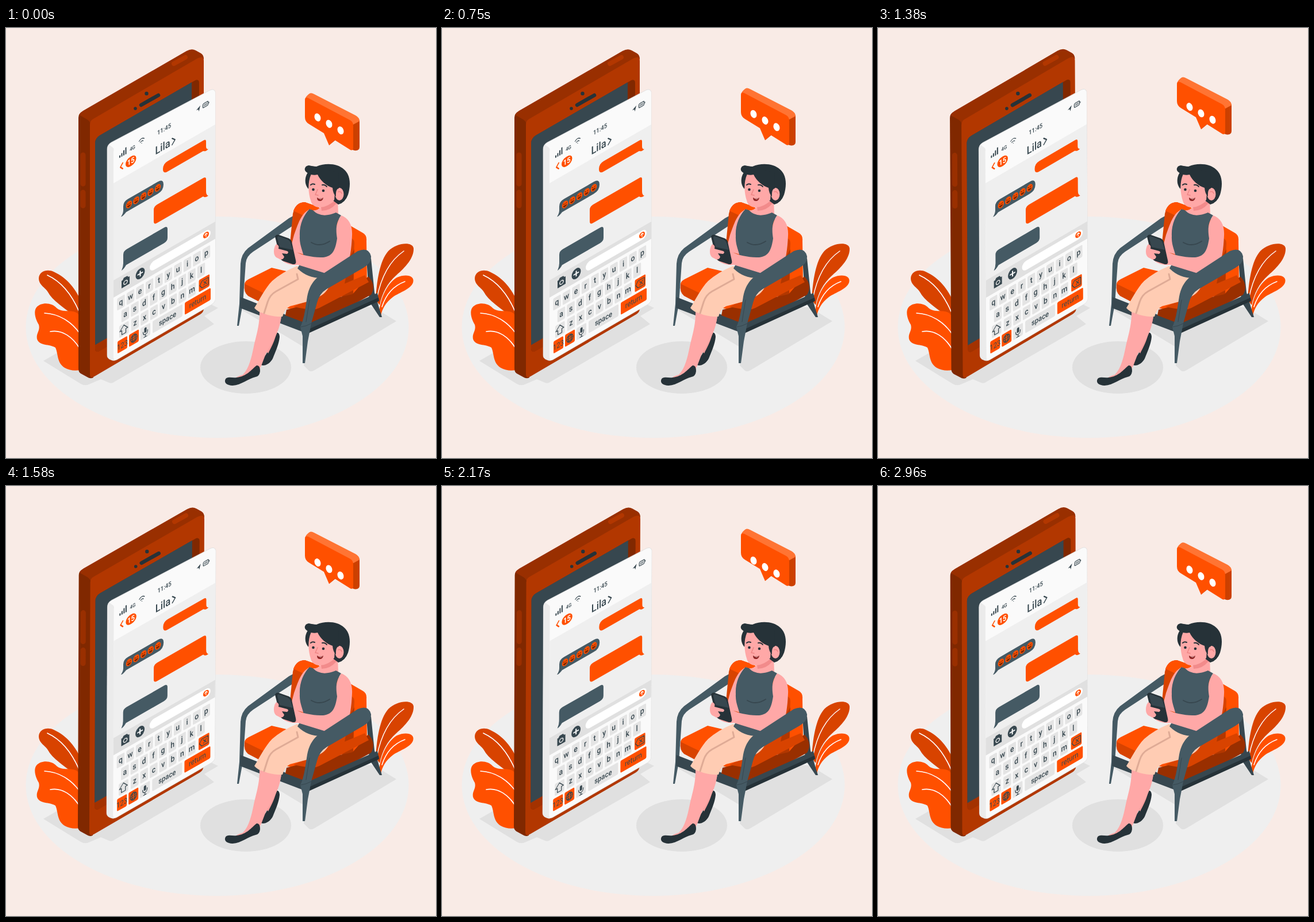
Recreate the animation shown at these times as an HTML page. Size 748 by 748 pixels, loop 3000 ms.

```html
<!DOCTYPE html>
<html lang="en">
<head>
<meta charset="utf-8">
<title>Chatting on the phone</title>
<style>
html, body { margin: 0; width: 100%; height: 100%; overflow: hidden; background: #f9ebe6 }
svg { display: block; width: 100vw; height: 100vh }
text { font-family: Roboto, "Liberation Sans", sans-serif; font-stretch: condensed; text-anchor: middle }
.o { fill: #ff5000 } .d { fill: #455a64 } .k { fill: #37474f } .b { fill: #263238 }
.s { fill: #ffa8a7 } .g { fill: #e0e0e0 } .w { fill: #fff }
.line { fill: none; stroke-linecap: round; stroke-linejoin: round }
</style>
</head>
<body>
<svg viewBox="0 0 748 748">
  <!-- floor and shadows -->
  <ellipse cx="367.500" cy="520.500" rx="333" ry="192.500" fill="#efefef"/>
  <g class="g">
    <path d="M65 579L112 552L343 474L369 487L345 501L362 515L186 617Q182 619 177 616L165 611L144 620Q137 623 130 619Z"/>
    <ellipse cx="417" cy="590.500" rx="79" ry="45.500"/>
    <path d="M409 490L500 480L640 486L679 510L537 595Q531 599 527 596L518 587V555L455 517Z"/>
  </g>

  <!-- right plant -->
  <path fill="#d84300" d="M643 473C645 440 650 405 665 388C680 373 707 371 709 383C710 400 695 416 679 430C663 444 654 462 650 482Z"/>
  <path class="o" d="M649 496C651 470 663 444 680 434C696 427 712 431 708 443C703 455 686 459 673 468C660 478 655 488 652 500Z"/>
  <path class="line" stroke="#fff" stroke-width="1.500" d="M645 471C652 435 667 405 692 388M654 485C661 463 675 448 694 441"/>

  <!-- left plant -->
  <path fill="#d84300" d="M132 512C110 492 83 477 74 461C69 451 57 448 57 435C58 422 73 419 83 424C107 435 122 455 132 478Z"/>
  <path class="o" d="M140 592Q118 600 102 591C88 582 91 566 86 556C76 549 58 554 54 541C52 531 60 527 57 516C52 508 47 494 53 486C62 476 80 478 88 487C98 496 114 489 124 496L142 515Z"/>
  <path class="line" stroke="#fff" stroke-width="1.700" d="M72 430C96 441 114 463 127 493M67 496C92 497 114 511 128 531M77 528C98 524 116 538 128 557"/>

  <!-- phone -->
  <g id="phone">
    <path fill="#802800" d="M126 156Q126 148 134 145L152 158V608Q147 611 141 607L130 601Q126 598 126 593Z"/>
    <path fill="#992f00" d="M127 151Q129 147 134 144L314 40Q323 35 330 39L339 44Q344 47 344 54L147 168Q146 162 141 159Z"/>
    <path fill="#b23700" d="M146 168Q146 161 152 158L331 54Q344 47 344 57V488Q344 494 338 498L154 606Q146 611 146 602Z"/>
    <path class="line" stroke="#b23700" stroke-width="8" d="M292 62L312 51"/>
    <path class="line" stroke="#992f00" stroke-width="9" d="M134 221V271M134 286V309"/>
    <g class="b"><circle cx="244.500" cy="114" r="3.200"/><circle cx="225" cy="140" r="2.800"/></g>
    <path class="line" stroke="#263238" stroke-width="6.500" d="M235 134L265 117"/>
    <clipPath id="well"><rect x="8" y="33" width="181" height="375" rx="8"/></clipPath>
    <g transform="translate(147 163) skewY(-30)" clip-path="url(#well)">
      <rect x="8" y="33" width="181" height="375" fill="#802800"/>
      <path fill="#a33200" d="M0 390H176L190 409H0Z"/>
      <rect class="k" x="-5" y="25" width="181" height="368" rx="5"/>
    </g>
    <path fill="#fafafa" stroke="#d9d9d9" stroke-width=".7" d="M176 211Q176 203 183 199L355 108Q362 105 364 111V470Q364 477 358 481L193 577Q187 580 182 577Q176 575 176 569Z"/>
    <path fill="#ebebeb" d="M176 211Q176 206 179 203L186 208Q188 210 188 216V578Q176 577 176 569Z"/>
    <clipPath id="edge"><rect width="177" height="370" rx="6"/></clipPath>
    <g transform="translate(187 209) skewY(-30)">
      <g clip-path="url(#edge)">
        <rect width="177" height="370" fill="#fafafa"/>
        <rect y="61" width="177" height="170" fill="#efefef"/>
        <rect class="g" y="230" width="177" height="30"/>
      </g>
      <!-- status bar and title -->
      <path class="k" d="M10 19h2v4h-2zM13.500 17h2v6h-2zM17 14h2v9h-2zM20.500 11h2v12h-2zM144 17.500L151 13L148.500 22L147.500 18Z"/>
      <g class="line" stroke="#37474f" stroke-width="1.200">
        <path d="M44.500 14Q49 9 53.500 14M46.500 17Q49 14.500 51.500 17M49 19.500v.2"/>
        <rect x="155.500" y="13" width="9" height="7" rx="1.500"/>
        <path stroke-width="1" d="M158 15v3M160 15v3M162 15v3M166 15.500v2"/>
        <path stroke-width="1.800" d="M102 42L107 47L102 53"/>
        <path stroke="#ff5000" stroke-width="2" d="M16 35L12 40L16 45"/>
      </g>
      <rect class="o" x="21" y="32" width="18.500" height="16.500" rx="8.200"/>
      <!-- messages -->
      <g class="o">
        <path d="M94 77H157Q161 77 161 81V90Q161 95 165 97Q160 99 156 95H94Q86 95 86 86T94 77Z"/>
        <path d="M76 142H156Q161 142 161 147V168Q161 175 165 178Q159 179 156 174H76Q70 174 70 168V148Q70 142 76 142Z"/>
      </g>
      <g class="d">
        <path d="M25 103H77Q87 103 87 113.500T77 124H22Q17 128 13 127Q17 123 17 118V111Q17 103 25 103Z"/>
        <path d="M23 189H88Q94 189 94 195V210Q94 216 88 216H22Q18 221 14 221Q17 216 17 210V195Q17 189 23 189Z"/>
      </g>
      <g id="smileys"></g>
      <!-- input bar -->
      <rect class="w" x="63" y="236.500" width="106" height="16" rx="8"/>
      <circle class="o" cx="161" cy="244" r="5"/>
      <path class="line" stroke="#fff" stroke-width="1.200" d="M161 247v-6M158.500 243.500L161 241L163.500 243.500"/>
      <path class="k" d="M16 239l2-3h6l2 3h2v13h-14v-13z"/>
      <circle class="line" cx="21" cy="245.500" r="3.200" stroke="#e0e0e0" stroke-width="1.500"/>
      <ellipse class="k" cx="46.500" cy="245" rx="8" ry="9"/>
      <path class="line" stroke="#fff" stroke-width="2" d="M42.500 245h8M46.500 241v8"/>
      <g id="keys"></g>
      <g class="line" stroke="#37474f" stroke-width="1.200">
        <path d="M18 318L25 326H21.500V333H14.500V326H11Z"/>
        <path d="M150 326L154 320H165V332H154ZM157 323L162 329M162 323L157 329"/>
        <ellipse cx="35.500" cy="351" rx="5.500" ry="6.500"/><ellipse cx="35.500" cy="351" rx="2.500" ry="6.500"/>
        <path d="M30 351h11M31 347.500h9M31 354.500h9"/>
        <path d="M51.500 350Q51.500 356 55.500 356T59.500 350M55.500 356v4M53 360h5"/>
        <path stroke-width="4" d="M55.500 346v5"/>
      </g>
      <g id="labels"></g>
    </g>
  </g>

  <!-- floating bubble -->
  <g id="bubble">
    <path fill="#cc4000" d="M601 164L615 160V207Q615 214 606 213L600 211ZM562 204L573 195L566 187Z"/>
    <path fill="#ff7433" d="M520 124Q522 118 528 114Q531 112 536 115L608 152Q615 156 615 162L604 168Z"/>
    <path class="o" d="M520 126Q520 119 526 122L598 160Q604 163 604 170V208Q604 214 599 212L572 195L562 204L553 183L527 167Q520 163 520 155Z"/>
  </g>
  <g id="dots" class="w"></g>

  <!-- chair, rear parts -->
  <path class="k" d="M627 400L635 401L641 460L654 503H650L632 476Z"/>
  <path class="d" d="M505 324V340L430 389Q418 397 417 409L412 480L405 518H402L406 480L408 410Q409 393 421 383L492 331Z"/>
  <path class="k" d="M408 468L520 512V530L407 487Z"/>
  <path fill="#d84300" d="M493 385L499 323Q503 303 520 303L540 310L612 352L606 465L560 470Z"/>
  <path class="o" d="M500 318Q506 303 520 303L540 310L620 356Q628 360 627 370L628 440Q627 454 612 460L603 463L606 374Q606 368 600 365Z"/>
  <path fill="#b23700" d="M597 400L606 385L604 464L585 468Z"/>
  <path class="o" d="M415 445Q416 440 422 437L462 417L560 440L500 490L440 476L421 462Z"/>
  <path fill="#d84300" d="M415 445L450 462L442 477L421 466Q413 460 415 445Z"/>
  <path fill="#992f00" d="M488 490L545 476L603 463L630 432Q645 447 635 464L546 513Q536 519 523 514L486 500Z"/>
  <path fill="#d84300" d="M500 485L548 462L624 430L631 442L545 487Q535 492 523 489Z"/>
  <path class="k" d="M520 517L646 461L649 474L524 531Z"/>
  <path class="b" d="M522 526L648 469L649 475L524 532Z"/>

  <!-- woman: legs -->
  <path class="b" d="M468 531Q475 527 476 537C475 550 469 562 464 575C459 585 446 591 441 584C440 577 451 575 456 560Z"/>
  <path fill="#fc9f9e" d="M455 495L480 497Q476 519 470 532C467 546 461 556 456 566L447 556Z"/>
  <path class="s" d="M441 490L479 500C477 525 465 545 456 560C447 574 446 590 436 600Q419 614 398 612Q400 606 412 603C423 592 427 573 431 554C435 535 442 516 441 490Z"/>
  <path class="b" d="M381 613C383 605 392 609 401 608C419 606 427 594 436 587Q442 586 442 597Q441 606 434 607C421 610 410 621 394 622Q380 621 381 613Z"/>
  <path fill="#ffccb3" d="M506 414Q480 425 463 440C451 452 442 471 432 487Q438 494 447 496Q463 503 481 502Q484 489 494 484L528 475C548 468 568 456 563 433Z"/>
  <path class="line" stroke="#dfab96" stroke-width="3" d="M506 428L508 437L470 458Q459 464 455 477L449 496"/>

  <!-- torso and arms -->
  <path class="s" d="M547 300L577 298L578 324Q560 337 534 325L528 317Q543 319 548 310ZM530 315C515 319 508 340 501 360L494 387L518 394V345Z"/>
  <path fill="#f28b8b" d="M548 311Q565 309 576 296L575 305Q564 318 549 318Z"/>
  <path class="d" d="M528 315L534 317Q548 332 574 321L583 326C573 340 574 351 577 366C578 385 572 400 571 432Q530 442 507 418L518 400C518 390 510 379 511 362C510 343 517 326 528 315Z"/>
  <path class="line" stroke="#37474f" stroke-width="2" d="M531 373Q546 382 563 371"/>
  <path class="s" d="M583 326C597 331 603 344 602 361C601 385 598 405 592 416C586 429 573 432 560 428L508 412C494 413 485 409 480 404L470 399C463 393 466 379 473 376L501 387C513 396 535 399 552 399C569 397 573 385 576 366C573 348 575 338 583 326Z"/>
  <path class="b" d="M468 363Q470 358 475 360L492 366Q496 368 497 372L504 404Q506 412 499 411L484 406Q479 405 477 400Z"/>
  <path class="k" d="M472 365Q472 361 477 363L490 368Q494 370 495 374L499 386L476 381Z"/>
  <path class="s" d="M470 376Q476 378 474 384L489 388Q493 390 489 393L480 392L484 398Q482 404 476 402L468 395Q464 383 470 376Z"/>

  <!-- head -->
  <path class="b" d="M526 253C517 249 518 241 527 240L540 241C557 234 577 236 588 246C601 257 599 277 595 290Q590 304 578 307L558 292Z"/>
  <path class="b" d="M530 247C520 253 517 270 526 280L532 262Z"/>
  <path class="s" d="M531 254C524 269 526 287 530 300Q533 312 546 312Q562 311 571 299L574 265L548 254Z"/>
  <ellipse class="s" cx="580" cy="289" rx="7.500" ry="11"/>
  <path class="b" d="M526 253C519 247 518 240 527 239Q537 241 540 242L578 251L579 279Q573 280 574 293Q569 289 568 278C558 275 547 266 542 255Q533 257 526 253Z"/>
  <circle class="b" cx="534.500" cy="281" r="2.300"/><circle class="b" cx="552" cy="283" r="2.300"/>
  <path class="line" stroke="#263238" stroke-width="2" d="M530 273Q533 270 537 272M550 273Q555 272 558 276"/>
  <path class="line" stroke="#ee8585" stroke-width="1.500" d="M542 281L538 290L543 291M578 285Q582 283 584 288"/>
  <path fill="#8f2626" d="M541 295Q547 298 552 295Q551 301 546 301T541 295Z"/>
  <path class="w" d="M542 295.500Q547 298 551 296Q547 299.500 542 295.500Z"/>

  <!-- chair, near arm -->
  <path class="d" d="M612 388Q631 380 635 397Q636 409 622 417L558 454Q545 462 541 478L531 514L525 545L520 583H516V536L512 520C519 505 521 486 524 467Q528 445 543 433Z"/>
  <path class="line" stroke="#37474f" stroke-width="1" d="M531 514Q522 519 513 520M528 473L522 511"/>
</svg>
<script>
const $ = id => document.getElementById(id);
const add = (id, markup) => $(id).innerHTML += markup;
const key = (x, y, w, hot) =>
  add('keys', `<rect x="${x}" y="${y - 10.5}" width="${w}" height="21" rx="2" fill="${hot ? '#ff5000' : '#e4e4e4'}"/>`);
// .866 is the horizontal foreshortening of the isometric plane
const label = (x, y, str, size, fill = '#37474f', weight = 500) =>
  add('labels', `<text transform="translate(${x} ${y}) scale(.866 1)" font-size="${size}" font-weight="${weight}" fill="${fill}">${str}</text>`);

[['qwertyuiop', 13, 276], ['asdfghjkl', 20.5, 301], ['zxcvbnm', 37.5, 326]].forEach(([row, x, y]) =>
  [...row].forEach((c, i) => {
    const cx = x + i * 16.5;
    key(cx - 6.7, y, 13.4);
    label(cx, y + 4, c, 14);
  }));
key(10, 326, 16.5);
key(148.5, 326, 18.5, true);
[[7, 17, true], [27, 17, true], [47, 17], [68, 52], [124, 45, true]].forEach(([x, w, hot]) => key(x, 351, w, hot));
label(15.5, 356, '123', 13, '#37474f', 400);
label(94, 355, 'space', 13);
label(146.5, 355, 'return', 13, '#37474f', 400);

label(88, 21.5, '11:45', 11);
label(33, 22, '4G', 9);
label(85.5, 53.5, 'Lila', 19);
label(30.2, 44.8, '15', 13, '#fff', 700);

for (let i = 0; i < 5; i++) {
  add('smileys', `<g transform="translate(${27 + i * 12.5} 113.5)"><ellipse class="o" rx="5.300" ry="6"/>
    <path class="line" stroke="#7a2800" stroke-width="1.200" d="M-3 -2L-1 -1M3 -2L1 -1"/>
    <path fill="#7a2800" d="M-3.500 1H3.500Q3 4.500 0 4.500T-3.500 1Z"/></g>`);
}
for (let i = 0; i < 3; i++) {
  add('dots', `<ellipse rx="5.200" ry="7.200" transform="translate(${542 + 20 * i} ${155.5 + 11.3 * i}) rotate(-22)"/>`);
}

const sway = t => {
  const p = t % 1500 / 1500;
  return p < .25 ? 4 * p : p < .75 ? 2 - 4 * p : 4 * p - 4;
};
const lift = t => {
  const p = Math.max(0, t - 460) / 1500;
  return Math.min(p, 2 - p);
};

function draw() {
  const t = performance.now() % 3000;
  $('phone').setAttribute('transform', `rotate(${sway(t)} 245 323)`);
  $('bubble').setAttribute('transform', `translate(0 ${-45 * lift(t)})`);
  $('dots').setAttribute('transform', `translate(0 ${-30 * lift(t)})`);
  requestAnimationFrame(draw);
}
draw();
</script>
</body>
</html>
```
